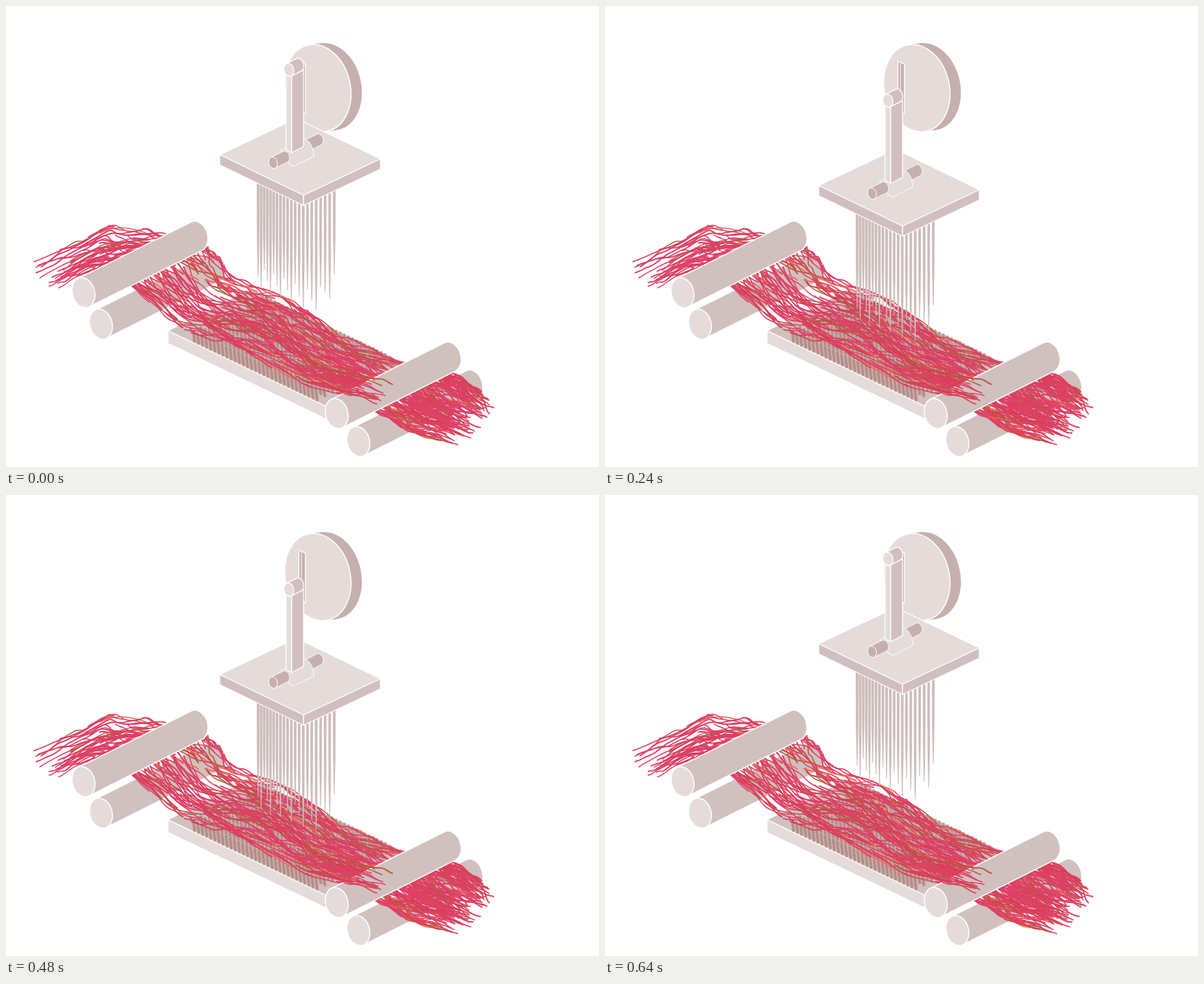
An HTML page that plays this animation: 849 by 660 pixels, repeating every 0.72 s.

```html
<!DOCTYPE html>
<html lang="en">
<head>
<meta charset="utf-8">
<title>Needle punching</title>
<style>
html, body { margin: 0; width: 100%; height: 100%; overflow: hidden; background: #fff; }
svg { display: block; width: 849px; height: 660px; }
</style>
</head>
<body>
<svg id="stage" viewBox="0 0 849 660" fill="none" stroke-linejoin="round"></svg>
<script>
const stage = document.getElementById('stage');
const LIGHT = '#e5dcda', MID = '#d0c1bf', FACE = '#d1bfc0', DARK = '#c6b0ae';

function add(parent, tag, attrs) {
  const el = document.createElementNS('http://www.w3.org/2000/svg', tag);
  for (const k in attrs) el.setAttribute(k, attrs[k]);
  return parent.appendChild(el);
}
const group = () => add(stage, 'g', {});
const shape = (g, d, fill, width = 1.3) =>
  add(g, 'path', { d, fill, stroke: '#fff', 'stroke-width': width });

// Parallelogram from a corner and its two sides.
const quad = (g, x, y, ax, ay, bx, by, fill) =>
  shape(g, `M${x} ${y}l${ax} ${ay}l${bx} ${by}l${-ax} ${-ay}Z`, fill);

const oval = (g, x, y, rx, ry, tilt, fill, width) => add(g, 'ellipse', {
  rx, ry, fill, stroke: '#fff', 'stroke-width': width, transform: `translate(${x} ${y}) rotate(${tilt})` });

// Cylinder with its near end at (x, y), axis (dx, dy) and size s.
function cylinder(g, x, y, dx, dy, s, body, cap, width = 1.5) {
  const ax = 7.9 * s, ay = 20.2 * s, rx = 16 * s, ry = 21.9 * s;
  shape(g, `M${x - ax} ${y - ay}l${dx} ${dy}A${rx} ${ry} -15 0 1 ${x + dx + ax} ${y + dy + ay}l${-dx} ${-dy}Z`, body, width);
  oval(g, x, y, rx, ry, -15, cap, width);
}
const roller = (x, y) => cylinder(group(), x, y, 163, -81.5, 1, MID, LIGHT);

let seed = 71;
function rand(a, b) {
  seed = (seed * 16807) % 2147483647;
  return a + (b - a) * seed / 2147483647;
}

function along(pts, u) {
  const f = Math.min(u, 0.9999) * (pts.length - 1), i = Math.floor(f), t = f - i;
  return [0, 1].map(k => pts[i][k] + (pts[i + 1][k] - pts[i][k]) * t);
}

function smooth(pts) {
  let d = `M${pts[0]}`;
  for (let i = 1; i < pts.length - 1; i++) {
    const [x, y] = pts[i], [nx, ny] = pts[i + 1];
    d += `Q${x} ${y} ${(x + nx) / 2} ${(y + ny) / 2}`;
  }
  return d;
}

function fibreColor() {
  const c = rand(0, 1);
  return c < 0.1 ? '#b75a42' : c < 0.15 ? '#ee6b4c' : c < 0.27 ? '#d93c50' : '#df3f66';
}

// Wavy fibres between two edge lines; each stops at a random place within ends.
function fibres(count, top, low, ends, len, wave) {
  const g = group(), steps = 14;
  for (let n = 0; n < count; n++) {
    const l = rand(...len), u0 = rand(...ends) - l;
    const v0 = rand(0, 1), drift = rand(-0.4, 0.4);
    const amp = rand(0.3, 1) * wave, turns = rand(6, 14), phase = rand(0, 6.28), pts = [];
    for (let i = 0; i <= steps; i++) {
      const t = i / steps, u = u0 + l * t;
      if (u < 0 || u > 1) continue;
      const v = Math.min(1, Math.max(0, v0 + drift * (t - 0.5)));
      const a = along(top, u), b = along(low, u);
      const s = amp * (Math.sin(phase + turns * t) + 0.4 * Math.sin(2.3 * turns * t));
      pts.push([a[0] + (b[0] - a[0]) * v - s * 0.4, a[1] + (b[1] - a[1]) * v + s]);
    }
    if (pts.length > 2) add(g, 'path', { d: smooth(pts), stroke: fibreColor(),
      'stroke-linecap': 'round', 'stroke-width': rand(1.4, 2) });
  }
}

// Wheel with its slot
const wheel = group();
for (let i = 4; i >= 0; i--)
  oval(wheel, 446.5 + 3.9 * i, 117.5 - 0.5 * i, 46.5, 63.2, -13, i ? DARK : LIGHT, i ? 0 : 1.5);
quad(wheel, 419.4, 79, 9.2, 4.2, 0, 71, DARK);
shape(wheel, 'M423 81v71', 'none', 1);

// Left web and rollers
fibres(64, [[240, 328], [150, 316], [20, 376]], [[195, 360], [120, 386], [48, 416]],
  [0.25, 1], [0.35, 0.65], 4);
roller(136, 455.5);

// Bed with rows of pins
const bed = group();
quad(bed, 232, 465, 118, -60, 228, 109, MID);
quad(bed, 232, 465, 228, 109, 0, 18, LIGHT);
for (let row = 9; row >= 0; row--) {
  let d = '';
  for (let i = 0; i < 31; i++) d += `M${270 + i * 5.85 + row * 11} ${480 + i * 2.79 - row * 5.6}l-1.8 -14`;
  for (const [stroke, width] of [['#cbb5b1', 5.2], [row > 6 ? '#b69c97' : '#b58d87', 3.8]])
    add(bed, 'path', { d, stroke, 'stroke-width': width, 'stroke-linecap': 'round' });
}

// Web on the bed
fibres(230, [[278, 338], [322, 380], [400, 417], [480, 473], [585, 518]],
  [[165, 390], [250, 458], [335, 492], [430, 541], [520, 572]], [0.05, 1.3], [0.25, 0.42], 4);
roller(111, 410.5);

// Right web and rollers
roller(504.5, 623.5);
fibres(150, [[595, 505], [650, 532], [705, 574]], [[510, 566], [575, 609], [662, 632]],
  [0.62, 1], [0.5, 0.9], 3);
roller(473.5, 583.5);
fibres(24, [[420, 490], [563, 544]], [[395, 524], [537, 570]], [0.7, 1], [0.5, 0.8], 3);

// Punch head: needles in three staggered rows, plate, hinge and bar
const head = group();
for (let i = 0; i <= 20; i++) {
  const x = 361 + 5.45 * i - 7 * Math.sin(Math.PI * i / 20);
  const front = x < 442 ? 402 + (x - 361) * 0.45 : 438 - (x - 442) * 0.9;
  const tip = front - 14 * ((2 * i + 1) % 3);
  shape(head, `M${x - 2} 240h4L${x + 1.7} ${tip - 55}L${x + 0.5} ${tip}h-1L${x - 1.8} ${tip - 55}Z`, '#cdbdbb', 0);
}
quad(head, 306, 213, 110, -52, 120, 58, LIGHT);
quad(head, 306, 213, 120, 58, 0, 14.5, FACE);
quad(head, 426, 271, 110, -52, 0, 14.5, FACE);
cylinder(head, 430, 200.5, 18.5, -9.5, 0.38, DARK, DARK, 0.9);
shape(head, 'M393 207L427 190Q440 196 441 215L412 229.5L405 226Q405 214 393 207Z', LIGHT, 0.9);
cylinder(head, 382.3, 224.4, 18, -8.7, 0.38, DARK, DARK, 0.9);
quad(head, 401, 96, 8, 4, 0, 110, LIGHT);
quad(head, 409, 100, 17, -8.7, 0, 110, FACE);
cylinder(head, 405, 91.5, 14.7, -7.5, 0.44, FACE, LIGHT, 1.3);

// One smooth stroke down and up, held in 40 ms steps
const LOOP = 720, START = 80, STEP = 40, DEPTH = 72;
const moves = [];
for (let time = 0; time <= LOOP; time += STEP) {
  const n = Math.min(14, Math.max(0, (time - START) / STEP));
  const y = DEPTH / 2 * (1 - Math.cos(Math.PI * n / 7));
  moves.push({ offset: time / LOOP, transform: `translateY(${y}px)`, easing: 'steps(1, end)' });
}
head.animate(moves, { duration: LOOP, iterations: Infinity });
</script>
</body>
</html>
```
